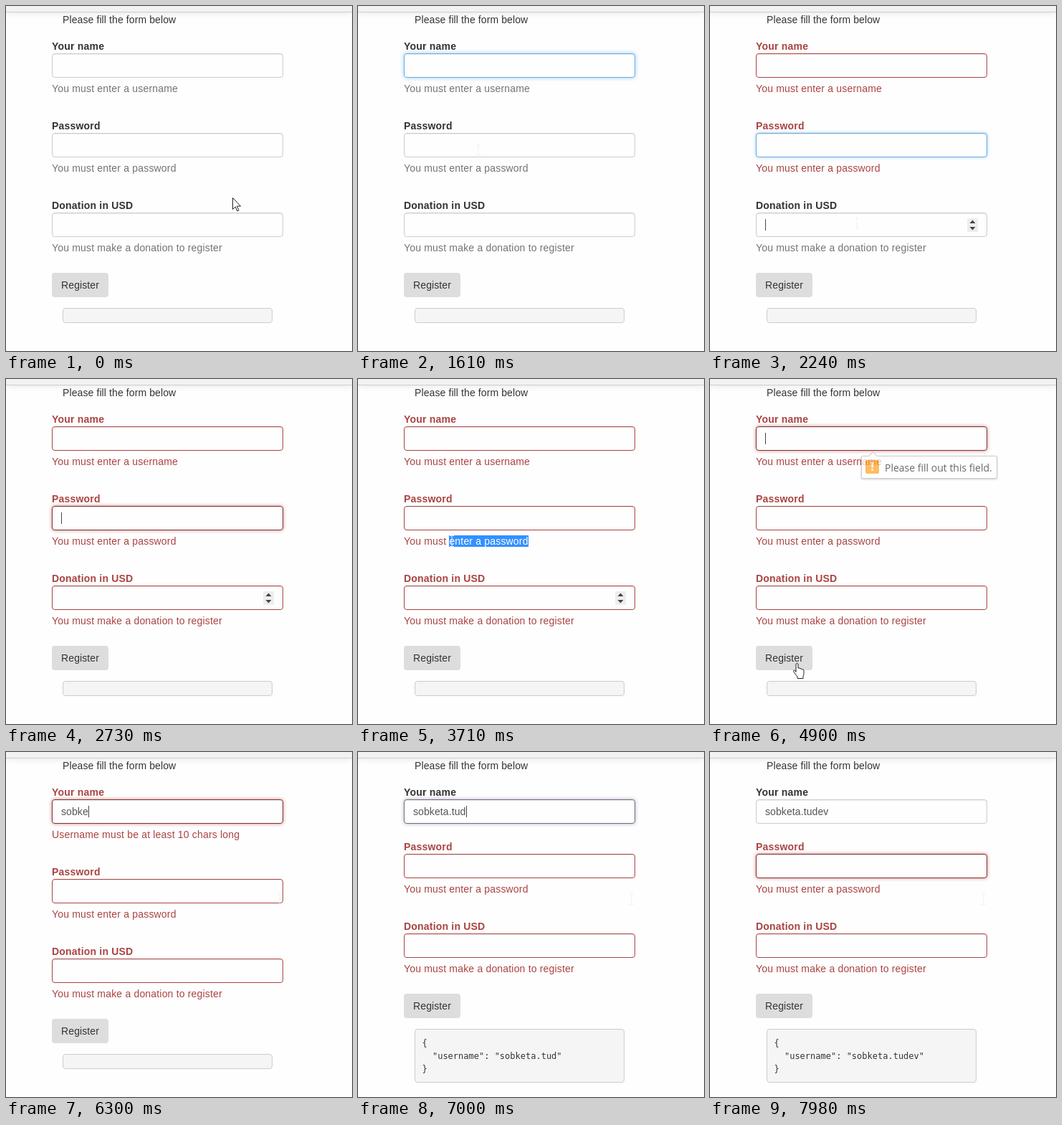
Animation, 483 px wide and 481 px high, one loop 8 s. Source, as an HTML page:

```html
<!DOCTYPE html>
<html lang="en">
<head>
<meta charset="utf-8">
<title>Form validation</title>
<style>
* { box-sizing: border-box; }
html, body { margin: 0; width: 100%; height: 100%; overflow: hidden; }
body { background: #fefefe; color: #333; font: 14px/20px "Liberation Sans", Arial, sans-serif; letter-spacing: .1px; }
#stage { position: relative; width: 483px; height: 481px; overflow: hidden; }
#bar { position: absolute; left: 0; top: 0; width: 100%; height: 9px; background: #f2f2f2; border-bottom: 1px solid #d0d0d0; box-shadow: 0 1px 10px #0000001a; }
#intro { position: absolute; left: 79px; top: 9px; }
#form { position: absolute; left: 64px; top: 46px; width: 323px; }
.group { margin-bottom: 22px; }
.label { height: 20px; font-weight: bold; letter-spacing: .2px; }
.field { height: 34px; padding-left: 12px; border: 1px solid; border-radius: 4px; background: #fefefe; color: #555; line-height: 32px; }
.caret { display: inline-block; width: 1px; height: 16px; margin-right: -1px; background: #444; vertical-align: -3px; }
.help { height: 35px; padding-top: 5px; letter-spacing: .18px; white-space: pre; }
.help b { font-weight: normal; background: #3390ff; color: #fff; }
#button { width: 79px; height: 34px; margin-top: -7px; border-radius: 4px; background: #ddd; line-height: 34px; text-align: center; }
#json { width: 293px; margin: 15px 0 0 15px; padding: 9.5px; border: 1px solid #ccc; border-radius: 4px; background: #f5f5f5; font: 12px/18px "DejaVu Sans Mono", monospace; letter-spacing: 0; white-space: pre; }
svg { position: absolute; left: 0; top: 0; }
#tip { position: absolute; left: 211px; top: 107px; width: 190px; height: 32px; padding-left: 32px; border: 1px solid #bbb; border-radius: 2px; background: #fff; box-shadow: 0 1px 3px #0004; font: 14px/31px "Open Sans", "Noto Sans", sans-serif; letter-spacing: 0; white-space: nowrap; }
#tip::before { content: ""; position: absolute; left: 11px; top: -5px; width: 8px; height: 8px; border: solid #bbb; border-width: 1px 0 0 1px; background: #fff; transform: rotate(45deg); }
#tip i { position: absolute; left: 5px; top: 5px; width: 19px; height: 19px; border-radius: 2px; background: #ffa62b; color: #fff; font: bold 16px/19px "Open Sans", sans-serif; text-align: center; }
</style>
</head>
<body>
<div id="stage">
  <div id="bar"></div>
  <div id="intro">Please fill the form below</div>
  <div id="form"><div id="groups"></div><div id="button">Register</div><div id="json"></div></div>
  <svg id="spinner" width="483" height="481"><rect x="359" y="296" width="15" height="19" fill="#eee"/><path d="M362.5 303l4-4.500 4 4.500zM362.500 308l4 4.500 4-4.500z" fill="#444"/></svg>
  <div id="tip"><i>!</i>Please fill out this field.</div>
  <svg width="483" height="481"><path id="mouse"/></svg>
</div>
<script>
const LOOP = 8000, BLINK = 530, FADE = 150;
const USER = 'sobketa.tudev', MIN_LENGTH = 10;
const KEYS = [5740, 5880, 6020, 6160, 6300, 6370, 6440, 6650, 6860, 6930, 7000, 7070, 7210];

// border colour, glow colour, glow size
const LOOKS = {
  idle: ['#ccc', '#0000', 0],
  focus: ['#66afe9', '#66afe999', 6],
  bad: ['#a94442', '#0000', 0],
  badFocus: ['#843534', '#ce8483', 5]
};
const FIELDS = [
  { label: 'Your name', help: 'You must enter a username', states: [[0, 'idle'], [1075, 'focus'], [1750, 'bad'],
    [3005, 'badFocus'], [3360, 'bad'], [4710, 'badFocus'], [6930, 'focus'], [7390, 'idle']] },
  { label: 'Password', help: 'You must enter a password', states: [[0, 'idle'], [1750, 'focus'], [2220, 'bad'],
    [2580, 'badFocus'], [3005, 'bad'], [7390, 'badFocus']] },
  { label: 'Donation in USD', help: 'You must make a donation to register', states: [[0, 'idle'], [2220, 'focus'], [2580, 'bad']] }
];
// time, x, y
const PATH = [
  [0, 316, 267], [70, 316, 267], [210, 385, 262], [420, 470, 165], [510, 440, 135], [650, 345, 88], [840, 232, 80],
  [980, 205, 85], [1400, 205, 85], [1610, 168, 200], [1820, 168, 200], [2100, 200, 300], [2240, 205, 304],
  [2450, 190, 198], [2590, 190, 198], [2730, 196, 117], [2870, 200, 111], [2940, 200, 111], [3010, 205, 93],
  [3080, 205, 93], [3220, 255, 245], [3360, 238, 228], [3500, 160, 226], [3640, 160, 226], [3710, 131, 226],
  [3850, 131, 226], [4050, 190, 300], [4340, 122, 398], [4920, 122, 398], [5000, 146, 404], [5250, 382, 205]
];
const POINTERS = {
  arrow: { d: 'M.5.5v16l3.700-3.600 2.600 6 2.200-1-2.600-5.800h5.100z', fill: '#fff', stroke: '#222', dx: 0, dy: 0 },
  hand: { d: 'M5 12.500V2q0-1.500 1.500-1.500T8 2v5q2.500-.8 3 1 2.300-.7 2.700 1 2.300-.3 2.300 1.700v4q0 2-1 3.500v3.300H7v-2.500L2 12.500q-1-2 .5-2.500T5 12.500z', fill: '#fff', stroke: '#222', dx: -7, dy: -2 },
  beam: { d: 'M-3-7.500h2.500q.5 0 .5.500 0-.5.500-.5H3M0-7V7M-3 7.500h2.500Q0 7.500 0 7q0 .5.500.5H3', fill: 'none', stroke: '#f0f0f0', dx: 0, dy: 0 }
};

const $ = id => document.getElementById(id);
const clamp = v => Math.min(1, Math.max(0, v));
const smooth = p => p * p * (3 - 2 * p);
const lerp = (a, b, p) => a + (b - a) * p;
const mix = (a, b, p) => `color-mix(in srgb, ${b} ${p * 100}%, ${a})`;
const show = (node, on) => node.style.display = on ? '' : 'none';

for (const field of FIELDS) {
  const group = document.createElement('div');
  group.className = 'group';
  group.innerHTML = `<div class="label">${field.label}</div><div class="field"><span></span><i class="caret"></i></div>` +
    '<div class="help"><span></span><b></b></div>';
  $('groups').append(group);
  const [label, box, help] = group.children;
  Object.assign(field, { labelNode: label, box, helpNode: help, text: box.firstChild, caret: box.lastChild });
}

function mouseAt(t) {
  const i = PATH.findLastIndex(k => k[0] <= t);
  const [t0, x0, y0] = PATH[i], [t1, x1, y1] = PATH[i + 1] || [LOOP, x0, y0];
  const p = (t - t0) / (t1 - t0);
  return [lerp(x0, x1, p), lerp(y0, y1, p)];
}

function pointerAt(x, y) {
  if (x > 64 && x < 143 && y > 372 && y < 406) return POINTERS.hand;
  const row = (y - 46) % 111;
  const overText = (row >= 20 && row < 54) || (row >= 59 && row < 79);
  return x > 64 && x < 387 && y > 46 && y < 350 && overText ? POINTERS.beam : POINTERS.arrow;
}

function drawField(field, t, typed, lastKey) {
  const i = field.states.findLastIndex(s => s[0] <= t);
  const [start, state] = field.states[i];
  const now = LOOKS[state], before = LOOKS[field.states[Math.max(0, i - 1)][1]];
  const p = smooth(clamp((t - start) / FADE));
  field.box.style.borderColor = mix(before[0], now[0], p);
  field.box.style.boxShadow = `inset 0 1px 1px #00000013, 0 0 ${lerp(before[2], now[2], p)}px ${mix(before[1], now[1], p)}`;

  const bad = state.startsWith('bad');
  field.labelNode.style.color = bad ? '#a94442' : '#333';
  field.helpNode.style.color = bad ? '#a94442' : '#737373';
  const focused = /focus/i.test(state);
  const since = Math.max(start, lastKey);
  show(field.caret, focused && Math.floor((t - since) / BLINK) % 2 === 0);
  field.text.textContent = typed;
}

function setHelp(field, text, selected = 0) {
  const cut = text.length - selected;
  field.helpNode.firstChild.textContent = text.slice(0, cut);
  field.helpNode.lastChild.textContent = text.slice(cut);
}

function draw(t) {
  const count = KEYS.filter(k => k <= t).length;
  const typed = USER.slice(0, count);
  const valid = count >= MIN_LENGTH;
  const [name, password, donation] = FIELDS;
  const [x, y] = mouseAt(t);

  drawField(name, t, typed, count ? KEYS[count - 1] : 0);
  drawField(password, t, '', 0);
  drawField(donation, t, '', 0);

  setHelp(name, count ? 'Username must be at least 10 chars long' : name.help);
  show(name.helpNode, !valid);
  const dragging = t >= 3360 && t < 3850;
  setHelp(password, password.help, dragging ? Math.round((238 - x) / 6.875) : 0);
  setHelp(donation, donation.help);

  $('json').textContent = valid ? `{\n  "username": "${typed}"\n}` : '';
  show($('spinner'), t >= 2090 && t < 4120);
  $('tip').style.opacity = clamp((t - 4740) / 220) * clamp((5880 - t) / 140);

  const { d, fill, stroke, dx, dy } = pointerAt(x, y);
  const attrs = { d, fill, stroke, transform: `translate(${Math.round(x) + dx} ${Math.round(y) + dy})` };
  for (const key in attrs) $('mouse').setAttribute(key, attrs[key]);
}

function frame() {
  draw(performance.now() % LOOP);
  requestAnimationFrame(frame);
}
frame();
</script>
</body>
</html>
```
